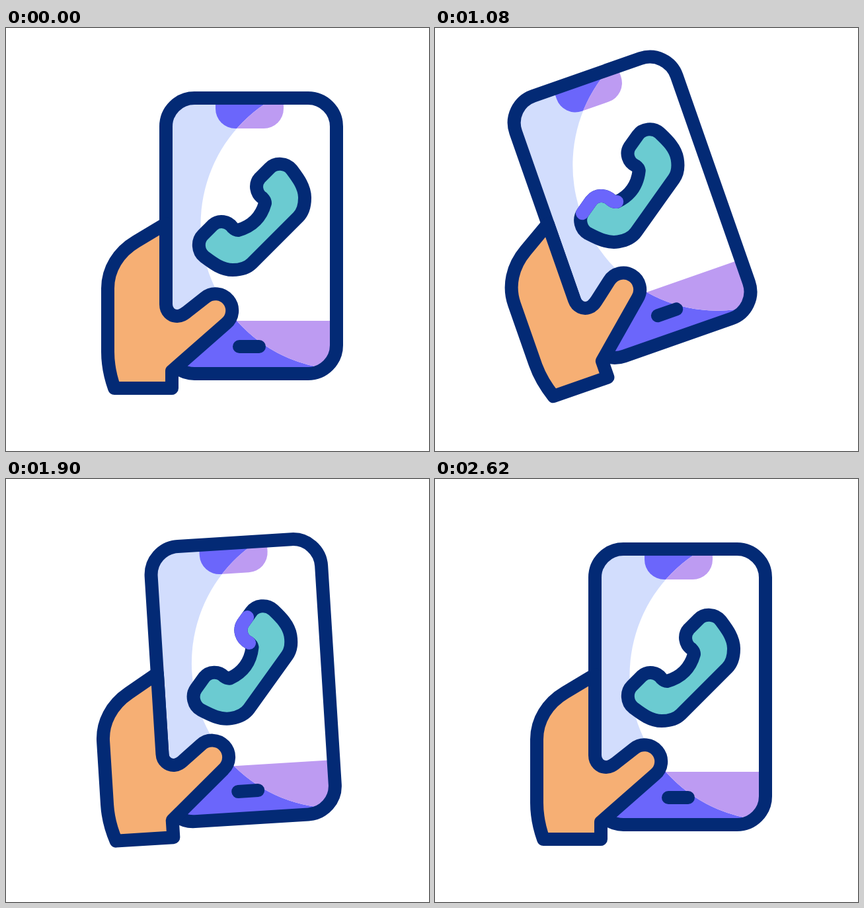
These frames come from a looping animation (640 px wide and 640 px high, 2.92 s). An HTML page:

```html
<!DOCTYPE html>
<html lang="en">
<head>
<meta charset="utf-8">
<title>Ringing phone in hand</title>
<style>
  html, body { margin: 0; width: 100%; height: 100%; overflow: hidden; background: #fff; }
  svg { display: block; width: 100vw; height: 100vh; }
  .line { fill: none; stroke: #032a75; stroke-width: 20; stroke-linecap: round; stroke-linejoin: round; }
  .accent { stroke: #6b66fb; }
</style>
</head>
<body>
<svg viewBox="0 0 640 640" xmlns="http://www.w3.org/2000/svg">
  <defs>
    <clipPath id="screen"><rect x="242" y="106" width="258" height="417" rx="43"/></clipPath>
    <clipPath id="light"><ellipse cx="511" cy="297.5" rx="216.5" ry="219"/></clipPath>
    <path id="notch" d="M317 106V122A30 30 0 0 0 347 152H390A30 30 0 0 0 420 122V106Z"/>
    <rect id="bar" x="242" y="443" width="258" height="80"/>
  </defs>

  <g id="device">
    <g clip-path="url(#screen)">
      <rect x="242" y="106" width="258" height="417" fill="#d2ddfd"/>
      <g fill="#6b66fb"><use href="#notch"/><use href="#bar"/></g>
      <g clip-path="url(#light)">
        <rect x="242" y="106" width="258" height="417" fill="#fff"/>
        <g fill="#bd9bf2"><use href="#notch"/><use href="#bar"/></g>
      </g>
    </g>
    <rect class="line" x="242" y="106" width="258" height="417" rx="43"/>
    <path class="line" d="M353 482H383"/>

    <g id="handset">
      <path id="receiver" class="line" style="fill:#6bcbd1"/>
      <path id="glow" class="line accent" pathLength="1"/>
    </g>

    <path class="line" style="fill:#f6af74" d="M242 296L197 323C170 339 154 365 154 394V490C154 510 158 528 164 545H251V519L333 447A25 25 0 0 0 301 408L273 430C269 433 265 436 259 436C250 436 242 429 242 418Z"/>
  </g>

  <g id="sparks"></g>
</svg>
<script>
const LOOP = 2920, HOLD = 200, STEP = 20, LAST = 121;
const $ = id => document.getElementById(id);
const clamp = x => Math.min(1, Math.max(0, x));
const span = (n, a, b) => clamp((n - a) / (b - a));
const ease = u => 0.5 - 0.5 * Math.cos(Math.PI * u);

// Outer side of the receiver, from the lower ear round to the upper one.
const OUTLINE = "M351 306C348 306 345 304 343 302C336 292 322 290 313 298L298 313" +
  "C289 322 290 338 300 346C312 355 326 366 343 366C356 366 365 363 372 356L442 286" +
  "C449 279 452 270 452 257C452 240 441 226 432 214C424 204 408 203 399 212L384 227" +
  "C376 236 378 250 388 257C390 259 392 262 392 265";

// Keys are [step, angle] pairs, eased from one to the next.
const SWING = [[0, 0], [19.2, -20.4], [39.5, -21.2], [70.5, 16.3], [90.5, -7.8], [111, 5.5], [121, 0]];
const SHAKE = [[0, 0], [28, 10], [44, 9.7], [60, -13], [72, -13], [98, 1.5], [112, 0]];

function at(keys, n) {
  let i = 1;
  while (i < keys.length - 1 && n > keys[i][0]) i++;
  const [a, from] = keys[i - 1], [b, to] = keys[i];
  return from + (to - from) * ease(span(n, a, b));
}

// Each spark: inner end, outer end, lead in steps.
const sparks = [
  [484, 68, 484, 40, 0],
  [556, 93, 577, 72, 0],
  [561.5, 164.5, 600, 166, 3]
].map(spec => {
  const el = document.createElementNS("http://www.w3.org/2000/svg", "line");
  el.setAttribute("class", "line accent");
  $("sparks").append(el);
  return { el, spec };
});

const glow = $("glow");
glow.setAttribute("d", OUTLINE);
$("receiver").setAttribute("d", OUTLINE + "Q383 297 351 306Z");

function show(el, on) {
  el.style.display = on ? "" : "none";
}

function drawGlow(n) {
  const u = span(n, 38, 86);
  const head = u + 0.17 * u * (1 - u);
  const tail = span(n, 44, 90.5);
  show(glow, head - tail > 0.002);
  glow.setAttribute("stroke-dasharray", `${Math.max(0, head - tail)} 2`);
  glow.setAttribute("stroke-dashoffset", -tail);
}

function drawSpark({ el, spec: [x1, y1, x2, y2, lead] }, n) {
  const head = ease(span(n + lead, 94, 109));
  const tail = ease(span(n + lead, 99, 115));
  show(el, head - tail > 0.01);
  const put = (i, p) => {
    el.setAttribute("x" + i, x1 + (x2 - x1) * p);
    el.setAttribute("y" + i, y1 + (y2 - y1) * p);
  };
  put(1, tail);
  put(2, head);
}

function draw(t) {
  const n = Math.min(LAST, Math.max(0, Math.floor((t - HOLD) / STEP + 0.001)));
  $("device").setAttribute("transform", `rotate(${at(SWING, n)} 207.5 506)`);
  $("handset").setAttribute("transform", `rotate(${at(SHAKE, n)} 393 306)`);
  drawGlow(n);
  sparks.forEach(s => drawSpark(s, n));
}

const start = performance.now();
function tick() {
  draw((performance.now() - start) % LOOP);
  requestAnimationFrame(tick);
}
tick();
</script>
</body>
</html>
```
